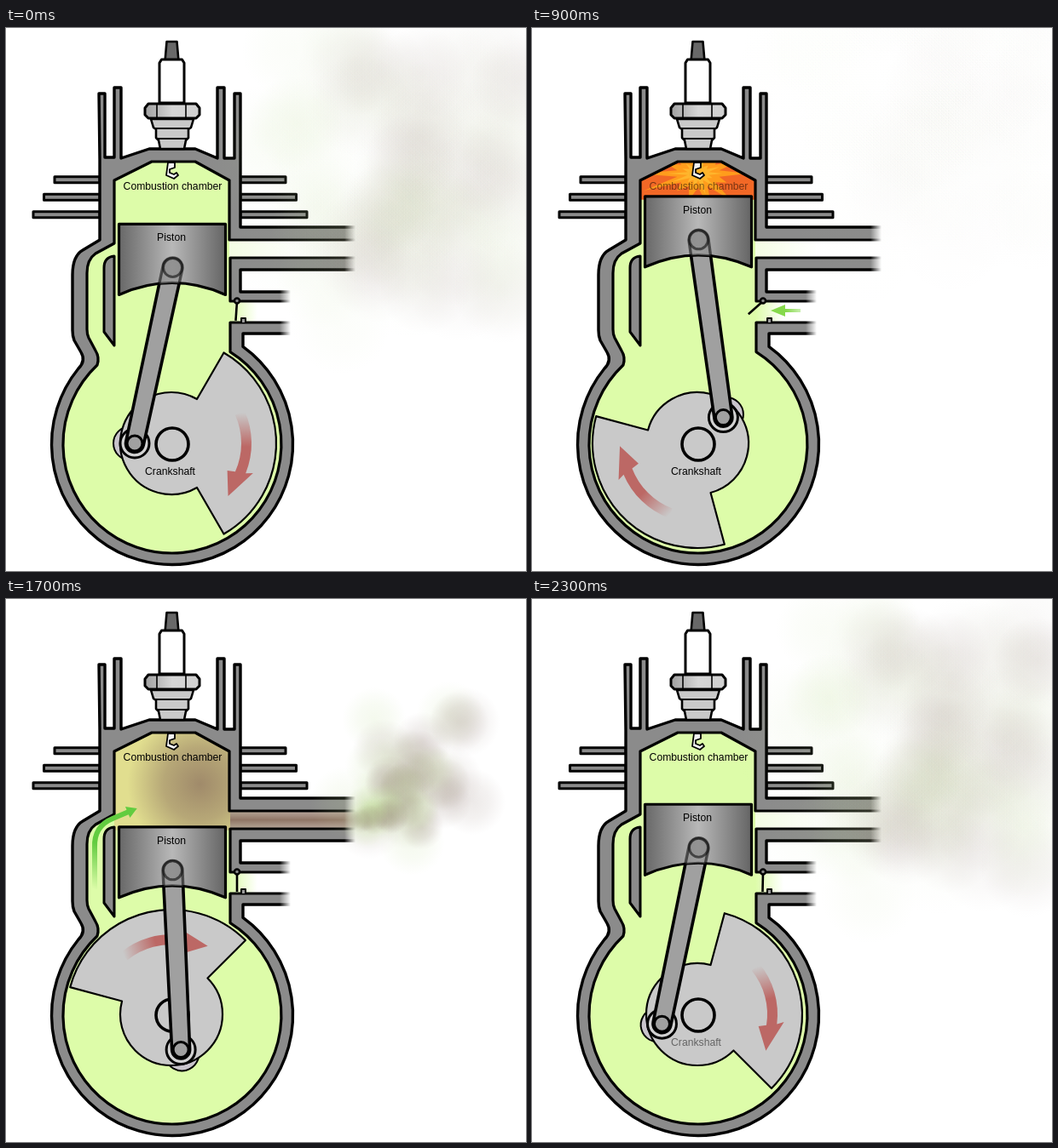
An HTML page with a canvas that plays this animation: 610 px wide and 638 px high, repeating every 2400 ms.

```html
<!DOCTYPE html>
<html lang="en">
<head>
<meta charset="utf-8">
<title>Two-stroke engine</title>
<style>
html, body { margin: 0; width: 100%; height: 100%; overflow: hidden; background: #fff; }
canvas { display: block; }
</style>
</head>
<body>
<canvas id="stage" width="610" height="638"></canvas>
<script>
const ctx = document.getElementById('stage').getContext('2d');
const LOOP = 2400, STEP = 100, TAU = Math.PI * 2, DEG = Math.PI / 180;
const METAL = '#8b8b8b', STEEL = '#c9c9c9';
const GREEN = [221, 252, 169], RICH = [160, 226, 100], FIRE = [242, 104, 38], BROWN = [138, 110, 94];
const axle = { x: 194, y: 488 }, THROW = 43, ROD = 211;

const housing = new Path2D('M109 77h7v75h11V70h8v83l33-11h54l26 11V70h8v83h12V77h7V234H412V284H275V310H336V359H278V374.4' +
  'A141.5 141.5 0 1 1 85 400Q94 391 88 381L80 367Q78 362 78 355V290Q78 268 90 261L110 249V155Z');
const cavity = new Path2D('M127 179L171 157H222L262 179V249H420V270H263V321H340V346H263V380.6' +
  'A128 128 0 1 1 107 396Q110 387 105 379L97 364Q95 360 95 354V288Q95 272 105 265L127 253Z');
const divider = new Path2D('M127 268Q115 269 115 282V357L127 373Z');
const transfer = document.createElementNS('http://www.w3.org/2000/svg', 'path');
transfer.setAttribute('d', 'M114 382L104 355V292Q103 267 125 258L182 234');

const mix = (a, b, k) => Array.isArray(a) ? a.map((v, i) => mix(v, b[i], k)) : a + (b - a) * k;
const clamp = k => Math.max(0, Math.min(1, k));
const fade = (t, from, to) => clamp((t - from) / (to - from));
const pulse = (t, a, b, c, d) => fade(t, a, b) * (1 - fade(t, c, d));
const settle = (t, span) => 1 - Math.exp(-t / span);
const rgba = (c, a = 1) => `rgba(${c.map(Math.round).join()},${a})`;

let seed = 7;
const rnd = () => (seed = seed * 16807 % 2147483647) / 2147483647;
const puffs = Array.from({ length: 90 }, (_, i) => {
  const green = i % 2;
  return {
    birth: 1420 + i * 5.5,
    x: green ? mix(290, 610, rnd()) : mix(400, 610, rnd()),
    y: mix(-10, 270, rnd()),
    sink: 150 * rnd(),
    rgb: green ? [196, 222, 158] : [150, 130, 122]
  };
});

function shape(path, fill, width = 3, stroke = '#000') {
  if (fill) { ctx.fillStyle = fill; ctx.fill(path); }
  if (width) { ctx.lineWidth = width; ctx.strokeStyle = stroke; ctx.stroke(path); }
}
function disc(x, y, r, fill, width) {
  const p = new Path2D();
  p.arc(x, y, r, 0, TAU);
  shape(p, fill, width);
}
// Outline symmetric about x, from half-widths and heights
function turned(x, ...half) {
  const p = new Path2D();
  half.forEach(([w, y]) => p.lineTo(x + w, y));
  half.reverse().forEach(([w, y]) => p.lineTo(x - w, y));
  p.closePath();
  return p;
}
function ramp(x0, y0, x1, y1, ...colours) {
  const g = ctx.createLinearGradient(x0, y0, x1, y1);
  colours.forEach((c, i) => g.addColorStop(i / (colours.length - 1), c));
  return g;
}
function fill(style, x, y, w, h) {
  ctx.fillStyle = style;
  ctx.fillRect(x, y, w, h);
}
function glow(x, y, r, rgb, alpha) {
  const g = ctx.createRadialGradient(x, y, 0, x, y, r);
  [1, .65, 0].forEach((k, i) => g.addColorStop(i / 2, rgba(rgb, alpha * k)));
  fill(g, x - r, y - r, 2 * r, 2 * r);
}
function label(text, x, y, alpha = 1) {
  ctx.globalAlpha = alpha;
  ctx.fillStyle = '#000';
  ctx.fillText(text, x, y);
  ctx.globalAlpha = 1;
}

function drawBlast(t) {
  const size = mix(.3, 1, fade(t, 600, 900));
  ctx.globalAlpha = pulse(t, 600, 700, 950, 1300);
  for (const [colour, k] of [['#ff9c1c', 1], ['#ffb52c', .5]]) {
    const p = new Path2D();
    for (let i = 0; i < 28; i++) {
      const r = size * k * (i % 2 ? 22 : 50 + 18 * Math.sin(i * 2.3)), a = i / 28 * TAU;
      p.lineTo(195 + r * 1.15 * Math.cos(a), 171 + r * .75 * Math.sin(a));
    }
    shape(p, colour, 0);
  }
  ctx.globalAlpha = 1;
}

function drawGas(t, top) {
  const haze = pulse(t, 1350, 1600, 1700, 2200);
  ctx.save();
  ctx.clip(cavity);
  fill(rgba(GREEN), 50, 150, 290, 480);
  fill(ramp(262, 0, 335, 0, '#f4fde4', '#fff'), 262, 240, 160, 32);
  fill(ramp(262, 0, 295, 0, rgba(GREEN), '#fff'), 262, 320, 80, 27);
  fill(ramp(0, 246, 0, 273, ...[.5, .95, .5].map(k => rgba(BROWN, haze * k))), 263, 240, 160, 32);

  ctx.beginPath();
  ctx.rect(127, 150, 136, top - 146);
  ctx.clip();
  const fresh = mix(GREEN, RICH, pulse(t, 0, 600, 700, 1200));
  fill(rgba(mix(fresh, FIRE, pulse(t, 600, 700, 900, 1900))), 127, 150, 136, 150);
  drawBlast(t);
  glow(195, 212, 60, [244, 168, 108], pulse(t, 1000, 1300, 1300, 1500) * .7);
  const along = fade(t, 1400, 2000);
  glow(195 + 65 * along, 185 + 65 * along, 85, BROWN, haze * .75);
  ctx.restore();
}

function drawTransferArrow(t) {
  const tail = Math.max(0, .17 * (t - 1450)), head = 91 + .165 * (t - 1300);
  const a = transfer.getPointAtLength(tail), b = transfer.getPointAtLength(head), near = transfer.getPointAtLength(head - 2);
  ctx.save();
  ctx.globalAlpha = pulse(t, 1150, 1600, 1850, 2100);
  ctx.setLineDash([Math.max(0, head - tail), 999]);
  ctx.lineDashOffset = -tail;
  shape(new Path2D(transfer.getAttribute('d')), null, mix(9, 4.5, fade(t, 1300, 1900)),
    ramp(a.x, a.y, b.x, b.y, 'rgba(98,204,64,0)', '#62cc40', '#62cc40'));
  ctx.translate(b.x, b.y);
  ctx.rotate(Math.atan2(b.y - near.y, b.x - near.x));
  shape(new Path2D('M-3-7L9 0L-3 7Z'), '#62cc40', 0);
  ctx.restore();
}

function drawCrank(angle) {
  ctx.save();
  ctx.translate(axle.x, axle.y);
  ctx.rotate(angle + Math.PI);
  disc(-48, 0, 20, '#c9c4cc', 2);
  const web = new Path2D();
  web.arc(0, 0, 60, 60 * DEG, 300 * DEG);
  web.arc(0, 0, 123, -60 * DEG, 60 * DEG);
  web.closePath();
  shape(web, STEEL, 2.2);

  const arrow = new Path2D();
  const corner = (r, a) => arrow.lineTo(r * Math.cos(a * DEG), r * Math.sin(a * DEG));
  arrow.arc(0, 0, 94, -24 * DEG, 22 * DEG);
  corner(102, 20);
  corner(91, 43);
  corner(73, 26);
  arrow.arc(0, 0, 82, 24 * DEG, -24 * DEG, true);
  shape(arrow, ramp(0, -36, 0, 4, 'rgba(188,104,101,0)', '#bc6865'), 0);
  ctx.restore();
  disc(axle.x + 1, axle.y + 1, 19, STEEL, 3.6);
}

function drawRodAndPiston(pin, y) {
  const x = 195.5, dir = Math.atan2(pin.y - y, pin.x - x), q = Math.PI / 2;
  const rod = new Path2D();
  rod.arc(x, y, 11.5, dir + q, dir - q);
  rod.arc(pin.x, pin.y, 10.5, dir - q, dir + q);
  rod.closePath();
  disc(pin.x, pin.y, 17, '#d2d2d2', 3);
  shape(rod, '#a0a0a0', 3.6);
  disc(pin.x, pin.y, 9, '#a0a0a0', 3);

  const piston = new Path2D(`M132.5 ${y - 51}H257.5V${y + 32}Q195 ${y + 4} 132.5 ${y + 32}Z`);
  shape(piston, ramp(132, 0, 258, 0, '#676767', '#b8b8b8', '#646464'), 3.2);
  ctx.save();
  ctx.clip(piston);
  ctx.globalAlpha = .55;
  shape(rod, '#888', 3.4);
  disc(x, y, 11, '#8a8a8a', 3);
  ctx.restore();
}

function drawPlug() {
  shape(turned(194.5, [6, 16], [8, 39]), '#686868', 2.6);
  shape(turned(194.5, [12, 37], [14.5, 41], [14.5, 88]), '#fff');
  shape(turned(195, [25, 107], [22, 117], [19, 119], [19, 129], [16, 132], [14, 142]), STEEL, 2.6);
  shape(new Path2D('M174 118H216M178 130H212'), null, 2);
  shape(turned(195, [28, 89], [32, 94], [32, 102], [28, 106]), ramp(163, 0, 227, 0, '#a0a0a0', '#d6d6d6', '#d0d0d0'));
  shape(new Path2D('M177 89V106M211 89V106'), null, 1.6);
  shape(new Path2D('M190 158H198V164L192 166V170L197 172L200 170L202 173L197 177L188 173Z'), '#f3f3f3', 1.8);
}

function drawValve(t) {
  ctx.globalAlpha = pulse(t, 100, 600, 950, 1200);
  shape(new Path2D('M280 332L297 325V330H315V334H297V339Z'), ramp(280, 0, 316, 0, '#86d94c', '#86d94c', '#cdf0b4'), 0);
  ctx.globalAlpha = 1;
  const suction = (1 + Math.cos((t - 680) / LOOP * TAU)) / 2;
  const open = 62 * DEG * suction ** 3;
  shape(new Path2D('M276 346V341H281V346'), '#999', 2);
  shape(new Path2D(`M271 321L${271 - 23 * Math.sin(open)} ${321 + 23 * Math.cos(open)}`), null, 2.6);
  disc(271, 320.5, 3, '#888', 2.4);
}

// Puffs shoot out of the exhaust, spread, sink a little, then rise and thin out
function drawSmoke(t) {
  for (const p of puffs) {
    const age = (t - p.birth + LOOP) % LOOP, k = settle(age, 160);
    const x = mix(mix(400, 490, k), mix(490, p.x, k), k);
    const y = mix(mix(259, 250, k), mix(250, p.y, k), k) + p.sink * settle(age, 700) - .13 * Math.max(0, age - 600);
    const alpha = .3 * (1 - age / LOOP) / (1 + (age / 330) ** 1.6);
    glow(x, y, 12 + 55 * settle(age, 350), p.rgb, alpha);
  }
}

function draw(t) {
  const angle = Math.PI + t / LOOP * TAU;
  const pin = { x: axle.x + THROW * Math.cos(angle), y: axle.y + THROW * Math.sin(angle) };
  const y = pin.y - Math.sqrt(ROD * ROD - (pin.x - axle.x) ** 2);

  fill('#fff', 0, 0, 610, 638);
  for (let i = 0; i < 3; i++) {
    const fin = new Path2D(), w = 53 + 12.5 * i;
    for (const x of [110 - w, 275]) fin.rect(x, 174.8 + 20.5 * i, w, 7);
    shape(fin, METAL);
  }
  shape(housing, METAL, 3.4);
  drawGas(t, y - 51);
  shape(cavity, null, 3.2);
  drawTransferArrow(t);
  drawCrank(angle);
  drawRodAndPiston(pin, y);
  shape(divider, METAL);
  drawPlug();
  drawValve(t);

  // Pipes fade out at their open ends
  for (const [x, top] of [[397, 225], [321, 304]]) {
    fill(ramp(x, 0, x + 13, 0, 'rgba(255,255,255,0)', '#fff'), x, top, 30, 64);
  }
  drawSmoke(t);

  label('Combustion chamber', 195.5, 190, fade(Math.abs(t - 600), 200, 400));
  label('Piston', 194, y - 31);
  label('Crankshaft', 192.5, 525, fade(Math.abs(t - 1800), 400, 600));
}

ctx.font = '12.2px "Liberation Sans", Arial, sans-serif';
ctx.textAlign = 'center';
ctx.lineJoin = 'round';
const start = performance.now();
function tick() {
  const t = performance.now() - start;
  draw(Math.floor(t / STEP) * STEP % LOOP);
  requestAnimationFrame(tick);
}
tick();
</script>
</body>
</html>
```
